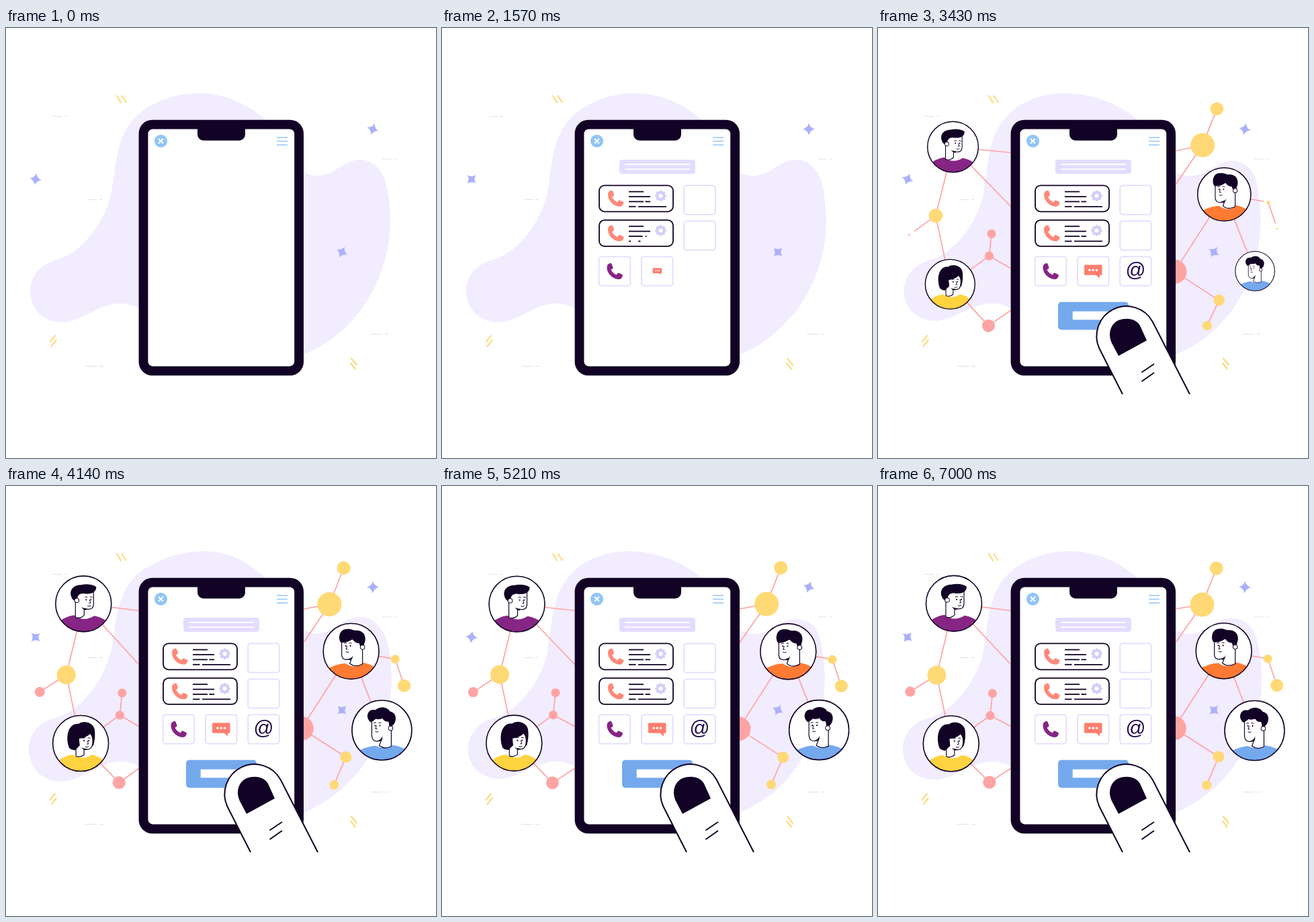
An HTML page with a canvas for the animation above (7.07 s loop, 640 px wide and 640 px high).

```html
<!DOCTYPE html>
<html lang="en">
<head>
<meta charset="utf-8">
<title>Phone contacts</title>
<style>
html, body { margin: 0; width: 100%; height: 100%; overflow: hidden; background: #fff; }
canvas { display: block; width: 640px; height: 640px; }
</style>
</head>
<body>
<canvas width="640" height="640"></canvas>
<script>
const c = document.querySelector('canvas').getContext('2d');
const LOOP = 7070, DARK = '#120225', LILAC = '#e4dcff', PINK = '#ffa3a3',
  YELLOW = '#ffd975', SKY = '#92c5f5', CORAL = '#ff8878';
let t = 0;

const clamp = v => Math.max(0, Math.min(1, v));
const mix = (a, b, p) => a + (b - a) * p;
const grow = (start, span = 260) => 1 - (1 - clamp((t - start) / span)) ** 3;
const phase = cycles => 2 * Math.PI * cycles * t / LOOP;

function fill(path, color) {
  c.fillStyle = color;
  c.fill(new Path2D(path));
}
function stroke(path, color = DARK, width = 1.8) {
  c.strokeStyle = color;
  c.lineWidth = width;
  c.stroke(new Path2D(path));
}
function disc(x, y, r, color) {
  c.beginPath();
  c.arc(x, y, r, 0, 7);
  c.fillStyle = color;
  c.fill();
}
function box(x, y, w, h, r, color, line) {
  c.beginPath();
  c.roundRect(x, y, w, h, r);
  if (color) { c.fillStyle = color; c.fill(); }
  if (line) { c.strokeStyle = line; c.lineWidth = 1.8; c.stroke(); }
}
function at(x, y, scale, draw, turn = 0) {
  if (scale <= 0) return;
  c.save();
  c.translate(x, y);
  c.rotate(turn * Math.PI / 180);
  c.scale(scale, scale);
  draw();
  c.restore();
}

// One slow swing bends the whole outline: top sideways, lobes in and out.
function blob() {
  const v = -Math.sin(phase(4.5));
  const l = 36 - 3 * v, top = 288 + 9 * v, r = 572 + 2.5 * v, shoulder = 196 - 2 * v, b = 438 + 2.5 * v;
  fill(`M${l},392C${l},366 ${l + 19},350 ${l + 40},345C118,333 ${l + 116},280 158,238
    C165,195 165,155 ${200 + 3 * v},126C${top - 63},106 ${top - 30},97 ${top},97
    C${top + 37},97 360,113 387,137C415,162 428,205 443,214
    C455,222 470,222 485,${shoulder + 18}C500,${shoulder + 10} 512,${shoulder} 526,${shoulder}
    C548,${shoulder} 563,214 ${r - 5},238C${r - 2},255 ${r},270 ${r},285
    C${r},375 520,455 443,486L320,480L198,418C185,410 172,408 160,411
    C133,415 110,${b} ${l + 47},${b}C${l + 20},${b} ${l},418 ${l},392Z`, '#f2ecff');
}

function scenery() {
  const tilt = Math.cos(phase(2.75) + 2.45);
  const star = (x, y, turn) => at(x, y, 1, () =>
    fill('M0,-9Q1.800,-1.800 9,0Q1.800,1.800 0,9Q-1.800,1.800 -9,0Q-1.800,-1.800 0,-9Z', '#abb0fc'), turn);
  star(44, 225, 25 + 20 * tilt);
  star(546, 150.5, 10 - 10 * tilt);
  star(500, 333.5, 35 + 10 * tilt);
  c.lineCap = 'round';
  stroke('M165,101l6,10M172.500,101l6.500,9.500M65.500,467l7.500,-9M67.500,473.500l7.500,-9M514,492l8,9.500M513,499l7,8.500', YELLOW, 2);
  c.lineCap = 'butt';
  stroke('M70,131.500h13m4,0h4M122,255.500h13m4,0h4M560,195h13m4,0h4M543,455.500h17m4,0h5M118,503.500h17m4,0h6', '#e2dfe7', 1);
}

const looks = {
  woman: { shirt: '#ffd23f', collar: 'M-45,36Q-28,18 -12,17Q3,26 16,17Q28,18 45,34V50H-45Z',
    back: 'M-17,7C-24,-12 -17,-31 -3,-29C4,-35 21,-31 21,-18Q22,-8 19,3L10,9H-4Q-12,12 -17,7Z',
    head: 'M-7,19V8L-2,3L-3,-8Q8,-9 14,-15Q18,-11 18,-4Q18,9 10,9L5,8V17Q-1,22 -7,19',
    hair: 'M-3,-7Q8,-8 15,-15L8,-24L-6,-18Z', face: [8, -4, 1], chin: 'M1,6Q5,9 10,9Q5,12 1,6Z' },
  manLeft: { shirt: '#862584', collar: 'M-45,34Q-30,19 -14,17Q0,28 16,18Q30,20 45,34V50H-45Z',
    head: 'M-12,20V-8L-6,-18H15V0Q15,9 6,8L1,7V17Q-5,23 -12,20',
    hair: 'M-18,-10C-22,-21 -14,-28 -4,-28C4,-30 14,-29 19,-25C19,-16 10,-14 2,-15C-4,-16 -8,-14 -9,-9L-12,-4Q-16,-5 -18,-10Z',
    ear: [-10, -5], face: [7, -6, 1], chin: 'M-3,5Q2,8 6,8Q2,12 -3,5Z' },
  manLow: { shirt: '#75a9ee', collar: 'M-50,38Q-24,24 -10,23Q4,30 16,22Q32,24 50,38V55H-50Z',
    head: 'M14,24V-6L8,-18H-15V8Q-14,18 -5,16L0,13L-4,23Q4,29 14,24',
    hair: 'M-17,-12C-26,-20 -20,-33 -10,-30C-2,-37 9,-34 12,-28C23,-26 22,-13 17,-8L14,-5L11,-6L10,-13Q3,-12 1,-18Q-4,-15 -9,-17Q-13,-13 -17,-12Z',
    ear: [13, -3], face: [-6, -7, -1], chin: 'M1,8Q-1,14 -6,16Q0,19 1,8Z' },
  manHigh: { shirt: '#ff7a33', collar: 'M-45,32Q-24,18 -8,18Q6,28 18,17Q34,19 45,33V50H-45Z',
    head: 'M17,19V-8L10,-18H-14V6Q-13,14 -4,12L1,10L-2,18Q6,25 17,19',
    hair: 'M-15,-13C-20,-18 -18,-34 -6,-33C0,-34 4,-30 8,-31C18,-31 22,-24 21,-16L19,-9Q15,-11 14,-6L12,-12Q6,-12 2,-18Q-6,-12 -15,-13Z',
    ear: [17, -6], face: [-4, -8, -1], chin: 'M3,6Q1,11 -5,12Q1,16 3,6Z' }
};

function portrait(r, look) {
  disc(0, 0, r, '#fff');
  c.save();
  c.clip();
  if (look.back) fill(look.back, DARK);
  fill(look.collar, look.shirt);
  fill(look.head, '#fff');
  stroke(look.head, DARK, 1.2);
  fill(look.hair, DARK);
  fill(look.chin, DARK);
  if (look.ear) {
    disc(...look.ear, 3.8, DARK);
    disc(...look.ear, 2.8, '#fff');
  }
  const [x, y, side] = look.face;
  c.translate(x, y);
  c.scale(side, 1);
  disc(-3, 0, 1.1, DARK);
  disc(4, 0, 1.1, DARK);
  stroke('M-5,-3.500q2,-1.500 4,-.5M2.500,-4q2,-1 4,.5M2,0l1.500,5h-2.500M-1,9q3,1.500 5,-.5', DARK, 1);
  c.restore();
  c.beginPath();
  c.arc(0, 0, r, 0, 7);
  c.strokeStyle = DARK;
  c.lineWidth = 1.6;
  c.stroke();
}

// Resting place, radius, and either a colour or a portrait.
const parts = [
  [109.4, 382, 41.5, looks.woman], [113.6, 176.4, 41.5, looks.manLeft],
  [560.2, 362.5, 44.5, looks.manLow], [514.4, 247, 41.5, looks.manHigh],
  [88, 280, 14, YELLOW], [48.5, 307.5, 7.5, PINK], [167.6, 340, 6.5, PINK],
  [166.5, 442.5, 9.5, PINK], [171, 307, 6.5, PINK], [593.4, 298.3, 9.5, YELLOW],
  [503.4, 121, 10, YELLOW], [506.7, 404.5, 8.5, YELLOW], [489, 443.7, 7, YELLOW],
  [580, 258.8, 6.5, YELLOW], [482.2, 175, 18, YELLOW], [440.5, 362, 18, PINK]
];
const anchors = [[198, 185.5], [198, 266], [198, 358], [198, 420], [443, 183], [443, 233]];
// Pairs run outward; letters number the parts, then the anchors.
const links = 'qb rb be ef ea ga gi sg ha th ok uo vo dn nj pd dc pl lm'.split(' ');

function network() {
  const spots = parts.map(([x, y, r, look], i) => ({
    x: x - Math.sin(phase(4.5)) * (x < 320 ? 2.3 : -1),
    y: y + Math.cos(phase(4.5)) * (i % 2 ? 1.6 : -1.6),
    r, look, start: 2950 + (Math.abs(x - 320) - 120) * 3
  }));
  const ends = spots.concat(anchors.map(([x, y]) => ({ x, y })));
  for (const pair of links) {
    const [a, b] = [...pair].map(letter => ends[parseInt(letter, 36) - 10]);
    const p = grow(b.start - 100, 300);
    if (p > 0) stroke(`M${a.x},${a.y}L${mix(a.x, b.x, p)},${mix(a.y, b.y, p)}`, PINK, 1.7);
  }
  for (const { x, y, r, look, start } of spots)
    at(x, y, grow(start, 400), () => look.shirt ? portrait(r, look) : disc(0, 0, r, look));
}

function phone() {
  box(197.6, 136.8, 245.4, 380.4, 20, DARK);
  box(211.4, 150.4, 217.8, 353, 7, '#fff');
  box(285, 148, 71, 19.5, [0, 0, 9, 9], DARK);
  disc(230.5, 168.2, 9.5, SKY);
  stroke('M227,164.700l7,7m0,-7l-7,7', '#fff', 2);
  stroke('M403,163h16M403,168.500h16M403,174h16', SKY, 1.6);
}

function handset(color) {
  fill('M-11,-9Q-9,-12 -6,-12Q-5,-12 -4.500,-11L-2.500,-5.500Q-2.300,-4.500 -3.200,-3.800L-5.500,-2.200Q-3,3 2.500,5.600L4.600,3Q5.300,2.200 6.300,2.600L11.300,5Q12.300,5.700 11.800,7Q10.500,12 6,12Q-2,11.500 -7.500,5Q-13,-2 -11,-9Z', color);
}

function gear() {
  disc(0, 0, 6.6, '#d5cdfa');
  for (let a = 0; a < 6.2; a += Math.PI / 4)
    disc(6.2 * Math.cos(a), 6.2 * Math.sin(a), 2.2, '#d5cdfa');
  disc(0, 0, 3, '#fff');
}

function card(y, start) {
  at(289, y + 19.5, grow(start), () => box(-55, -19.5, 110, 39, 8, '#fff', DARK));
  at(258.5, y + 19.5, grow(start + 150), () => handset(CORAL));
  at(325.5, y + 15.5, grow(start + 220), gear);
  const rows = [[[278, 22]], [[278, 32]], [[278, 22], [302.5, 7.5]], [[278, 10.5], [292, 42]]];
  rows.forEach((row, i) => row.forEach(([x, w], j) => {
    const p = clamp((t - start - 220 - i * 90) / (j ? 500 : 140));
    if (p > 0) stroke(`M${x},${y + 9.3 + i * 7.4}h${w * p}`);
  }));
}

function screen() {
  at(320.5, 206.5, grow(250), () => {
    box(-56.5, -10.5, 113, 21, 4, LILAC);
    stroke('M-48.500,-3.500h97M-48.500,3.700h97', '#fff');
  });
  card(234.3, 500);
  card(285.9, 1040);
  // Two tiles down the right side, then three along the bottom row.
  for (let i = 0; i < 5; i++) {
    const x = i < 2 ? 383.5 : 257 + 63.25 * (i - 2), y = 256 + 53 * Math.min(i, 2);
    at(x, y, grow(900 + 45 * i * i), () => box(-23.3, -21.7, 46.6, 43.4, 4, '', LILAC));
  }
  at(257, 362, grow(1260), () => handset('#862584'));
  at(320.5, 362, grow(1516), () => {
    box(-13.5, -9.5, 26.5, 15.2, 1.5, '#ff7d6e');
    fill('M3,5L9.500,10.500V5Z', '#ff7d6e');
    for (const x of [-5.5, -.3, 4.9]) disc(x, -1.7, 1.8, '#fff');
  });
  at(383.5, 362, grow(1750), () => {
    c.font = '29.5px "Liberation Sans", Arial, sans-serif';
    c.textAlign = 'center';
    c.fillStyle = '#200a4c';
    c.fillText('@', 0, 7.5);
  });
  at(320.5, 428.5, grow(1900), () => box(-52.5, -20.7, 105, 41.4, 5, '#75a9ee'));
  const size = grow(2000) * mix(1, .8, grow(2800, 240));
  at(320.5, 428, size, () => box(-38.5, -7.8, 77, 15.6, 1, '#fff'));
}

function finger() {
  if (t < 2200) return;
  const away = 1 - grow(2200, 500);
  at(324 + 110 * away, 412 + 230 * away, mix(.842, 1, grow(2800, 240)), () => {
    c.translate(-324, -412);
    const skin = 'M364,545L329.400,477A44.400,44.400 0 0 1 408.600,437L464,545';
    fill(skin, '#fff');
    stroke(skin, DARK, 2);
    fill('M358,488L348,469C341,454 347,440 358,435C372,430 385,434 390,443L400,465Z', DARK);
    stroke('M392.500,512.500l18.500,-12.500M392.500,526l18.500,-13', DARK, 2);
  });
}

function frame(now) {
  t = now % LOOP;
  c.clearRect(0, 0, 640, 640);
  blob();
  scenery();
  network();
  phone();
  screen();
  finger();
}
const begin = performance.now();
requestAnimationFrame(function tick(now) {
  frame(Math.max(0, now - begin));
  requestAnimationFrame(tick);
});
</script>
</body>
</html>
```
